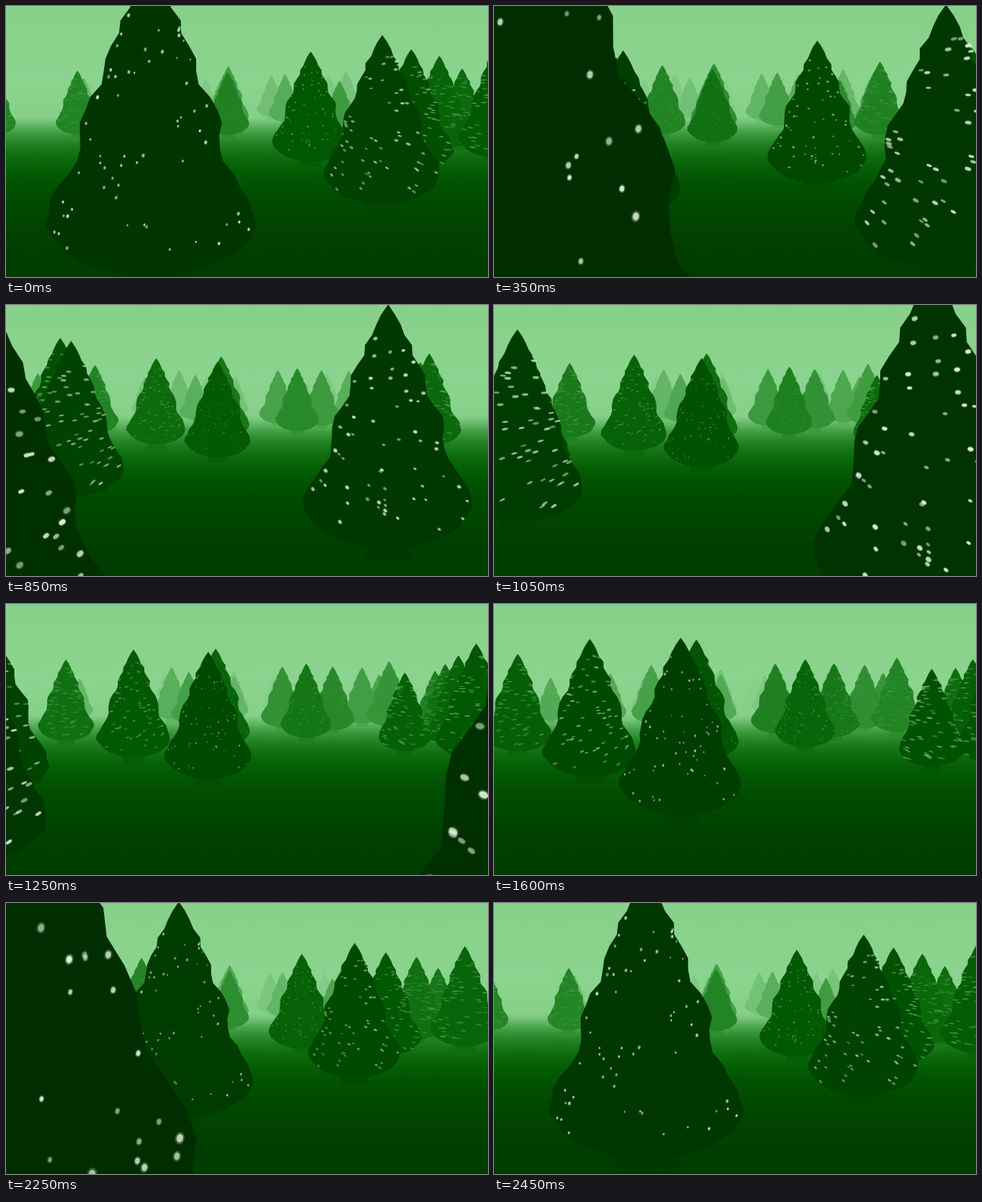
These frames come from a looping animation (634x357 px, 2500 ms). An HTML page with a canvas:

```html
<!DOCTYPE html>
<html lang="en">
<head>
<meta charset="utf-8">
<title>Night drive through a fir forest</title>
<style>
  html, body { margin: 0; width: 100%; height: 100%; overflow: hidden; background: #87d28b; }
  canvas { display: block; }
</style>
</head>
<body>
<canvas id="stage" width="634" height="357"></canvas>
<script>
const ctx = document.getElementById('stage').getContext('2d');
const WIDTH = 634, HEIGHT = 357;
const LOOP = 2500, STEP = 50;
const EYE = { x: 317, y: 110 };
const GROUND = 59;      // ground below eye level at depth 1
const FAR = 2, NEAR = 0.012;

// Trees along the path: side offset, depth at loop start, top above eye level.
// The forest repeats every depth unit, the distance travelled in one loop.
const PATH_TREES = [
  [-25, 0.99, 23], [-30.5, 0.24, 38], [52, 0.62, 31], [69.4, 0.39, 28],
  [-51.5, 0.49, 18], [-96, 0.755, 26], [-95.5, 0.14, 32], [-200, 0.34, 31],
  [-140, 0.91, 38], [-223, 1, 25], [118, 0.546, 29], [188, 0.743, 33],
  [225, 0.795, 22], [215, 0.65, 40], [147, 0.208, 14]
];

const mix = (a, b, k) => a + (b - a) * k;
const clamp = v => Math.min(1, Math.max(0, v));
const smooth = v => clamp(v) ** 2 * (3 - 2 * clamp(v));

function fog(depth) {
  const red = 134 * smooth((depth - 0.5) / 1.4);
  const green = 44 + 165 * Math.sin(Math.PI / 2 * clamp(depth / 2)) ** 1.7;
  return `rgb(${red.toFixed(1)},${green.toFixed(1)},${(red * 1.03).toFixed(1)})`;
}

function generator(seed) {
  return () => {
    seed = (seed + 0x6d2b79f5) | 0;
    let n = Math.imul(seed ^ (seed >>> 15), 1 | seed);
    n = (n + Math.imul(n ^ (n >>> 7), 61 | n)) ^ n;
    return ((n ^ (n >>> 14)) >>> 0) / 4294967296;
  };
}

// Half-width at height h below the tip: a cone with ever longer tiers and a round hem.
function radiusAt(h) {
  if (h <= 0) return 0;
  const tier = Math.log(h / 0.165) / Math.log(1.68);
  const hem = Math.sqrt(1 - clamp((h - 0.8) / 0.205) ** 2);
  return 1.15 * h ** 0.8 * (1 + 0.075 * Math.cos(2 * Math.PI * tier)) * hem;
}

function makeTree([x, depth, top], index) {
  const random = generator(index * 97 + 11);
  const side = sign => Array.from({ length: 24 }, (_, i) => {
    const h = (i + 1) / 24;
    return [h, sign * radiusAt(h) * (0.97 + random() * 0.06)];
  });
  const outline = [[0, 0], ...side(1), ...side(-1).reverse()];
  const lights = Array.from({ length: 60 }, () => {
    const h = 0.1 + 0.83 * random() ** 0.75;
    return {
      h,
      x: radiusAt(h) * 0.97 * Math.sin((random() - 0.5) * 2.8),
      size: 0.6 + 0.5 * random(),
      glow: 0.45 + 0.55 * random()
    };
  });
  return { x, depth, top, width: (top + GROUND) / 1.52, outline, lights };
}

function plantForest() {
  const spots = [...PATH_TREES];
  for (let i = 0; i < 4; i++) spots.push([187 + 16 * i, 0.12 + 0.11 * i, 36 - 5 * i]);
  for (let i = 0; i < 2; i++) spots.push([-330, i * 0.54, 18 + 6 * i]);
  return spots.map(makeTree);
}

const forest = plantForest();

function drawBackdrop() {
  const start = EYE.y + GROUND / 1.8;
  const sky = ctx.createLinearGradient(0, 0, 0, start);
  sky.addColorStop(0, '#86d18a');
  sky.addColorStop(0.7, '#8bd48f');
  sky.addColorStop(1, fog(FAR));
  ctx.fillStyle = sky;
  ctx.fillRect(0, 0, WIDTH, HEIGHT);

  const ground = ctx.createLinearGradient(0, start, 0, HEIGHT);
  for (let i = 0; i <= 40; i++) {
    const k = (i / 40) ** 1.5;
    const depth = GROUND / (mix(start, HEIGHT, k) - EYE.y);
    ground.addColorStop(k, fog(depth * 1.1 + 0.05));
  }
  ctx.fillStyle = ground;
  ctx.fillRect(0, start, WIDTH, HEIGHT - start);
}

function fillOutline(points) {
  ctx.beginPath();
  points.forEach(point => ctx.lineTo(...point));
  ctx.closePath();
  ctx.fill();
}

function drawLights(tree, z, place) {
  const fade = clamp(1.25 - z);
  if (!fade) return;
  const tint = clamp((z - 0.2) / 0.5);
  const radius = Math.min(6, 0.55 / z);
  // Trees beside the path streak away from the vanishing point.
  const streak = Math.min(3, Math.max(0, Math.abs(tree.x) - 30) * 0.016 / z);
  ctx.fillStyle = `rgb(${mix(238, 105, tint)},${mix(255, 195, tint)},${mix(234, 107, tint)})`;
  for (const light of tree.lights) {
    const [x, y] = place(light.h, light.x);
    const r = Math.max(0.75, radius * light.size);
    const angle = streak > 0.8 ? Math.atan2(y - EYE.y, x - EYE.x) : 0.2;
    const bulb = (scale, alpha) => {
      ctx.globalAlpha = fade * light.glow * alpha;
      ctx.beginPath();
      ctx.ellipse(x, y, r * 0.75 * scale + streak, r * scale, angle, 0, 2 * Math.PI);
      ctx.fill();
    };
    bulb(1.35, 0.3);
    bulb(0.9, 0.9);
  }
  ctx.globalAlpha = 1;
}

function drawTree({ tree, z }) {
  const cx = EYE.x + tree.x / z;
  const half = tree.width / 2 / z;
  if (cx + half * 1.1 < 0 || cx - half * 1.1 > WIDTH) return;
  const tip = EYE.y - tree.top / z;
  const height = (tree.top + GROUND) / z;
  const place = (h, x) => [cx + x * half, tip + h * height];

  ctx.fillStyle = fog(z * 0.96);
  const trunk = half * 0.3;
  ctx.globalAlpha = 0.5;
  ctx.fillRect(cx - trunk, tip + height * 0.95, trunk * 2, height * 0.1);
  ctx.globalAlpha = 1;
  fillOutline(tree.outline.map(([h, x]) => place(h, x)));
  drawLights(tree, z, place);
}

function draw(time) {
  const travelled = Math.floor((time % LOOP) / STEP) * STEP / LOOP;
  const visible = [];
  for (const tree of forest) {
    for (let z = tree.depth - travelled; z < FAR; z += 1) {
      if (z > NEAR) visible.push({ tree, z });
    }
  }
  visible.sort((a, b) => b.z - a.z);
  drawBackdrop();
  visible.forEach(drawTree);
}

const began = performance.now();
function tick() {
  draw(performance.now() - began);
  requestAnimationFrame(tick);
}
tick();
</script>
</body>
</html>
```
